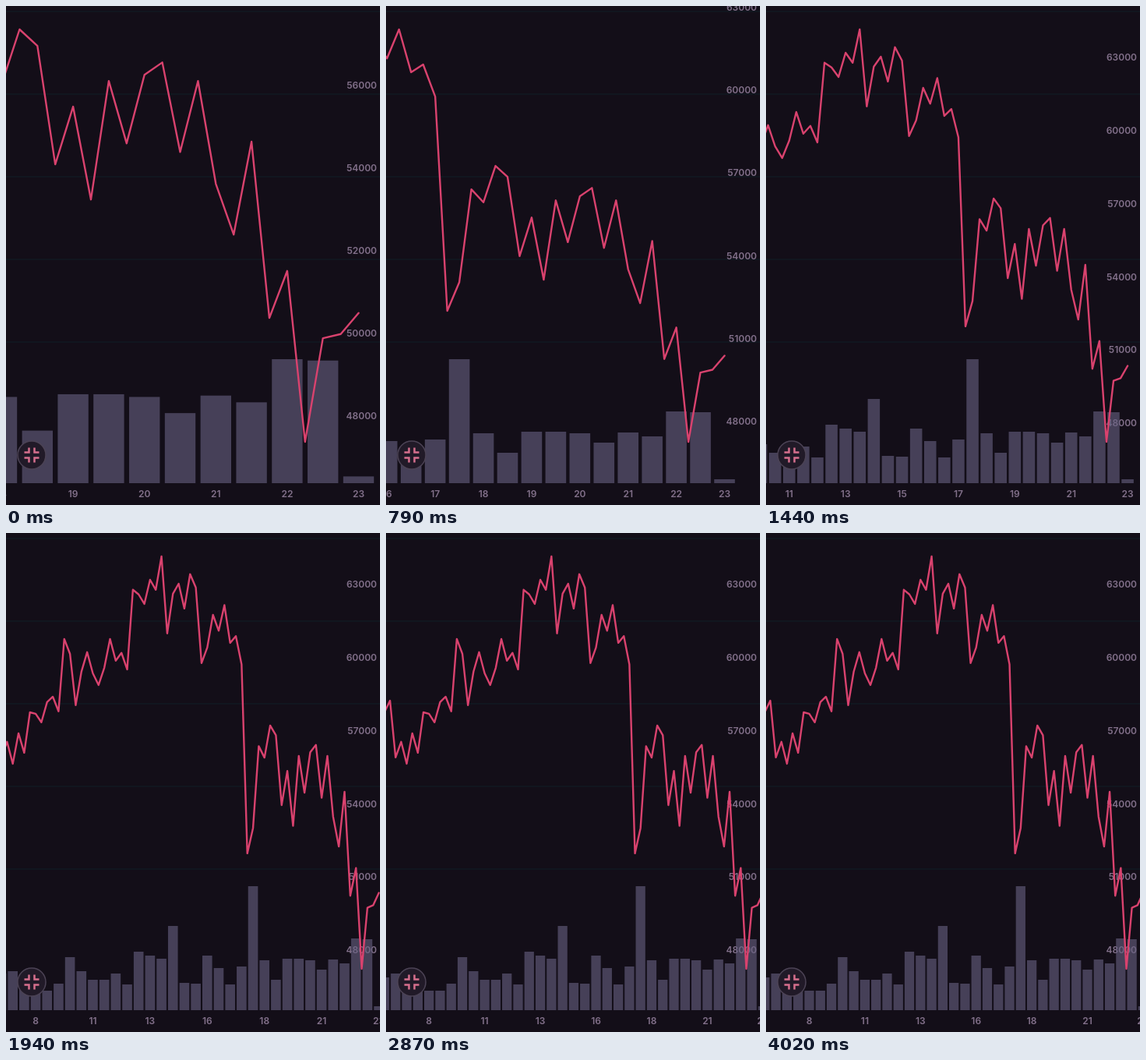
Animation, 480 px wide and 640 px high, one loop 4.09 s. Source, as an HTML page with a canvas:

```html
<!DOCTYPE html>
<html lang="en">
<head>
<meta charset="utf-8">
<title>Price chart zoom</title>
<style>
  html, body { margin: 0; width: 100%; height: 100%; overflow: hidden; background: #130e18; }
  canvas { display: block; }
</style>
</head>
<body>
<canvas id="chart" width="480" height="640"></canvas>
<script>
const ctx = document.getElementById('chart').getContext('2d');
const W = 480, H = 640, LOOP = 4090, FIRST = 6;
const TOP = 30, BOTTOM = 559, BASE = 612, BAR_MAX = 159;

// Prices in tens, one every quarter day
const prices = [
  5811, 5859, 5626, 5690, 5600, 5725, 5645, 5811, 5805, 5770, 5853, 5875,
  5815, 6112, 6051, 5840, 5978, 6058, 5971, 5923, 5994, 6112, 6023, 6055,
  5987, 6314, 6295, 6256, 6355, 6314, 6451, 6135, 6298, 6339, 6237, 6378,
  6323, 6013, 6077, 6211, 6146, 6251, 6096, 6124, 6008, 5232, 5336, 5672,
  5625, 5757, 5717, 5430, 5570, 5345, 5632, 5481, 5647, 5677, 5460, 5632,
  5383, 5260, 5485, 5058, 5172, 4758, 5009, 5019, 5070
].map(p => p * 10);

// Volumes, one every half day
const volumes = [
  42, 47, 50, 34, 25, 25, 34, 68, 50, 39, 39, 47, 33, 75, 70, 66, 108, 35,
  34, 70, 54, 33, 56, 159, 64, 39, 66, 66, 64, 52, 65, 60, 92, 91, 5
];

// Visible days over time: [ms, left, right]
const keys = [
  [0, 18.06, 23.3], [650, 16, 23.73], [790, 15.98, 23.735],
  [1440, 10.185, 23.44], [1940, 6.706, 23.05], [2370, 6.144, 22.951],
  [2870, 6.07, 22.865], [3400, 6.057, 22.863], [LOOP, 6.057, 22.863]
];

// Monotone cubic through the keys
function track(t, col) {
  const rate = i => (keys[i + 1][col] - keys[i][col]) / (keys[i + 1][0] - keys[i][0]);
  const slope = i => {
    if (i === 0 || i === keys.length - 1) return 0;
    const a = rate(i - 1), b = rate(i);
    return a * b > 0 ? 2 * a * b / (a + b) : 0;
  };
  let i = 0;
  while (i < keys.length - 2 && t >= keys[i + 1][0]) i++;
  const span = keys[i + 1][0] - keys[i][0];
  const u = (t - keys[i][0]) / span, v = 1 - u;
  return keys[i][col] * v * v * (1 + 2 * u) + keys[i + 1][col] * u * u * (3 - 2 * u)
    + span * u * v * (slope(i) * v - slope(i + 1) * u);
}

const view = t => ({ left: track(t, 1), right: track(t, 2) });

function priceAt(day) {
  const q = Math.max(0, Math.min(prices.length - 1, (day - FIRST) * 4));
  const i = Math.min(prices.length - 2, Math.floor(q));
  return prices[i] + (prices[i + 1] - prices[i]) * (q - i);
}

function extent(t) {
  const { left, right } = view(t);
  const inside = step => (_, i) => FIRST + i * step >= left && FIRST + i * step <= right;
  const seen = [priceAt(left), priceAt(right), ...prices.filter(inside(1 / 4))];
  return [Math.max(...seen), Math.min(...seen), Math.max(...volumes.filter(inside(1 / 2)))];
}

// The vertical scale trails the zoom a little
function scale(t) {
  const n = 10, sum = [0, 0, 0];
  for (let k = 0; k < n; k++)
    extent(Math.max(0, t - k * 20)).forEach((v, i) => sum[i] += v / n);
  return sum;
}

function drawButton() {
  ctx.beginPath();
  ctx.arc(33, 576, 18, 0, 2 * Math.PI);
  ctx.fillStyle = '#211a28';
  ctx.fill();
  ctx.strokeStyle = '#4c4355';
  ctx.lineWidth = 1.5;
  ctx.stroke();
  ctx.beginPath();
  for (const sx of [-1, 1]) for (const sy of [-1, 1]) {
    ctx.moveTo(33 + sx * 9.5, 576 + sy * 3.5);
    ctx.lineTo(33 + sx * 3.5, 576 + sy * 3.5);
    ctx.lineTo(33 + sx * 3.5, 576 + sy * 9.5);
  }
  ctx.strokeStyle = '#d66f8d';
  ctx.lineWidth = 2.5;
  ctx.stroke();
}

function draw(t) {
  const { left, right } = view(t);
  const [high, low, peak] = scale(t);
  const day = W / (right - left);
  const x = d => (d - left) * day;
  const y = p => TOP + (high - p) / (high - low) * (BOTTOM - TOP);

  ctx.fillStyle = '#130e18';
  ctx.fillRect(0, 0, W, H);
  ctx.fillStyle = '#11161f';
  for (let gy = 7; gy < 440; gy += 106) ctx.fillRect(0, gy - 1, W, 2);

  ctx.font = '600 12px Inter, Lato, sans-serif';
  ctx.textBaseline = 'middle';
  ctx.fillStyle = '#82708a';
  ctx.textAlign = 'right';
  const step = Math.round((high - low) / 5000) * 1000;
  for (let p = Math.ceil(low / step) * step; y(p) > -10; p += step)
    ctx.fillText(p, 476, y(p) - 10.5);

  ctx.textAlign = 'center';
  const gap = Math.round((right - left) * 2 / 6.9) / 2;
  for (let d = 23; x(d) > -20; d -= gap) ctx.fillText(Math.round(d), x(d), 626.5);

  ctx.fillStyle = 'rgba(104, 97, 131, .6)';
  const bar = day * 0.43;
  volumes.forEach((v, i) => {
    const h = v / peak * BAR_MAX;
    ctx.fillRect(x(FIRST + i / 2) - bar / 2, BASE - h, bar, h);
  });

  drawButton();

  ctx.beginPath();
  prices.forEach((p, i) => ctx.lineTo(x(FIRST + i / 4), y(p)));
  ctx.strokeStyle = '#d9426e';
  ctx.lineWidth = 2.4;
  ctx.lineJoin = ctx.lineCap = 'round';
  ctx.stroke();
  ctx.lineJoin = 'miter';
  ctx.lineCap = 'butt';
}

const start = performance.now();
function frame() {
  draw((performance.now() - start) % LOOP);
  requestAnimationFrame(frame);
}
frame();
</script>
</body>
</html>
```
